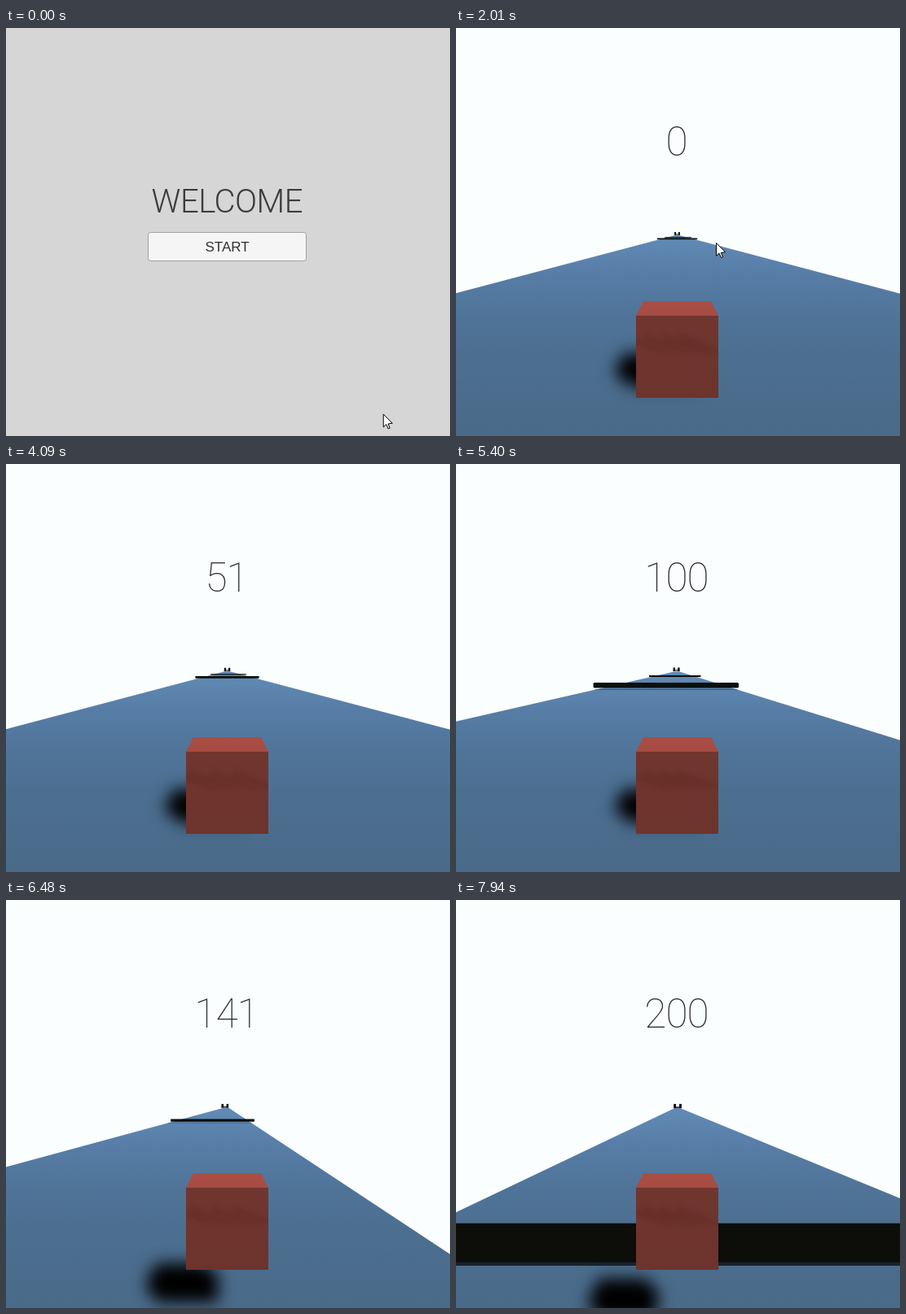
An HTML page with a canvas that plays this animation: 545x502 px, repeating every 8000 ms.

```html
<!DOCTYPE html>
<html lang="en">
<head>
<meta charset="utf-8">
<title>Cube runner</title>
<style>
  html, body { margin: 0; width: 100%; height: 100%; overflow: hidden; background: #d6d6d6; }
  canvas { display: block; }
</style>
</head>
<body>
<canvas id="stage" width="545" height="502"></canvas>
<script>
const ctx = document.getElementById('stage').getContext('2d');
const W = 545, H = 502, LOOP = 8000;

// Camera
const CX = 271.5, HORIZON = 254.5, FOCAL = 455;
const EYE = 1.98, BACK = 5;

// World
const HALF = 7.5, GATE = 662, END = 1500;
const BARS = [
  { z: 133.3, x: 0, top: 0.72, bottom: 0.22, color: '#0a100e' },
  { z: 202.4, x: 0.5, top: 0.68, bottom: 0.22, color: '#0d0d0a' }
];

// Keys: seconds followed by values
const CURSOR = [
  [0, 463, 475], [0.35, 372, 322], [0.54, 312, 233], [0.69, 299, 257],
  [0.77, 299, 257], [1, 533, 298], [1.24, 319, 264]
];
const SIDE = [[4.9, 0], [5.4, 1.15], [6.1, 2.85], [6.48, 3.13], [7.63, 0], [7.94, -0.56]];
const RUN = [[4.09, 51], [5.4, 100], [6.48, 141], [7.63, 188], [7.94, 200], [8, 202.3]];
const JUMPS = [[5.73, 4.9], [7.625, 5.77]];
const PRESS = 1.54, PLAY = 1.62, GO = 1.9, CURSOR_OFF = 2.25;

function track(keys, t) {
  if (t <= keys[0][0]) return keys[0].slice(1);
  for (let i = 1; i < keys.length; i++) {
    const a = keys[i - 1], b = keys[i];
    if (t <= b[0]) {
      const k = (t - a[0]) / (b[0] - a[0]);
      return a.slice(1).map((v, j) => v + (b[j + 1] - v) * k);
    }
  }
  return keys[keys.length - 1].slice(1);
}

// Speed builds up against drag, then stays nearly even
function distance(t) {
  if (t < GO) return 0;
  if (t >= RUN[0][0]) return track(RUN, t)[0];
  const s = t - GO, drag = 1.1;
  return 37.4 * (s - (1 - Math.exp(-drag * s)) / drag);
}

function lift(t) {
  let y = 0;
  for (const [start, speed] of JUMPS) {
    const s = t - start;
    if (s > 0) y = Math.max(y, speed * s - 4.9 * s * s);
  }
  return y;
}

function poly(points, fill) {
  ctx.beginPath();
  points.forEach(([x, y]) => ctx.lineTo(x, y));
  ctx.closePath();
  ctx.fillStyle = fill;
  ctx.fill();
}

function fade(y0, y1, ...colors) {
  const g = ctx.createLinearGradient(0, y0, 0, y1);
  colors.forEach((c, i) => g.addColorStop(i / (colors.length - 1), c));
  return g;
}

function text(str, x, y, font, color, spacing = 0) {
  ctx.font = font;
  ctx.letterSpacing = spacing + 'px';
  ctx.textAlign = 'center';
  ctx.fillStyle = color;
  ctx.fillText(str, x + spacing / 2, y);
}

function drawCursor(x, y) {
  ctx.save();
  ctx.translate(x + 0.5, y + 0.5);
  poly([[0, 0], [0, 16], [3.5, 12.6], [6, 18], [8, 17.2], [5.8, 12], [11, 11.2]], '#fff');
  ctx.strokeStyle = '#000';
  ctx.lineWidth = 1;
  ctx.stroke();
  ctx.restore();
}

function drawMenu(pressed) {
  ctx.fillStyle = '#d6d6d6';
  ctx.fillRect(0, 0, W, H);
  text('WELCOME', CX, 227.3, '300 40px Roboto, sans-serif', '#3c3c3c', -0.5);
  ctx.beginPath();
  ctx.roundRect(174.5, 251.5, 194, 35, 3);
  ctx.fillStyle = pressed ? '#c8c8c8' : '#f5f5f5';
  ctx.fill();
  ctx.strokeStyle = '#a0a0a0';
  ctx.lineWidth = 1;
  ctx.stroke();
  text('START', CX, 275.3, '17px "Liberation Sans", Arial, sans-serif', '#323232');
}

// Convex outline of a set of points
function hull(points) {
  const sorted = points.slice().sort((a, b) => a[0] - b[0] || a[1] - b[1]);
  const chain = list => {
    const out = [];
    for (const p of list) {
      while (out.length > 1) {
        const [a, b] = out.slice(-2);
        if ((b[0] - a[0]) * (p[1] - a[1]) - (b[1] - a[1]) * (p[0] - a[0]) > 0) break;
        out.pop();
      }
      out.push(p);
    }
    return out.slice(0, -1);
  };
  return chain(sorted).concat(chain(sorted.reverse()));
}

function drawGate(px, eye, dist) {
  const s = FOCAL / dist, x = CX - px * s;
  const yAt = h => HORIZON + (eye - h) * s;
  const post = 3 * s, top = yAt(7), base = yAt(1.6);
  ctx.fillStyle = '#0c0f10';
  ctx.fillRect(x - 5 * s, top, post, base - top);
  ctx.fillRect(x + 2 * s, top, post, base - top);
  ctx.fillRect(x - 5 * s, yAt(3.4), 10 * s, 1.4 * s);
}

function drawBar(bar, px, eye, z) {
  const d = bar.z - z + BACK;
  if (d < 1) return;
  const point = (x, h, depth) => [
    CX + (x - px) * FOCAL / depth, HORIZON + (eye - h) * FOCAL / depth
  ];
  const near = d + 0.35, far = d + 1.3;
  poly([point(-HALF, 0, near), point(HALF, 0, near), point(HALF, 0, far), point(-HALF, 0, far)], '#18222c');

  const [left, bottom] = point(bar.x - HALF, bar.bottom, d);
  const right = point(bar.x + HALF, 0, d)[0];
  const top = point(0, bar.top, d + 1)[1];
  const cut = Math.min(2, (bottom - top) / 6);
  poly([
    [left, top + cut], [left + cut, top], [right - cut, top], [right, top + cut],
    [right, bottom - cut], [right - cut, bottom], [left + cut, bottom], [left, bottom - cut]
  ], bar.color);
}

function drawShadow(eye, up) {
  const r = 0.44, points = [];
  for (const h of [up + 0.35, up + 1])
    for (const x of [-r, r])
      for (const z of [-r, r]) {
        const depth = BACK + z + 0.727 * h;
        points.push([CX + (x - 0.46 * h) * FOCAL / depth, HORIZON + eye * FOCAL / depth]);
      }
  ctx.save();
  ctx.filter = 'blur(9.5px)';
  poly(hull(points), '#000');
  ctx.restore();
}

function drawCube(z) {
  poly([[221, 354], [230, 336], [313, 336], [322, 354]], fade(336, 354, '#a94f45', '#a64b41'));
  ctx.fillStyle = fade(354, 455, '#713630', '#6f342e', '#6d332d');
  ctx.fillRect(221, 354, 101, 101);
  ctx.save();
  ctx.beginPath();
  ctx.rect(221, 354, 101, 101);
  ctx.clip();
  ctx.filter = 'blur(2px)';
  for (let i = 0; i < 4; i++) {
    const x = 206 + i * 23 + 3 * Math.sin(z * 0.7 + i), y = 375;
    poly([[x, y], [x + 62, y + 26], [x + 46, y + 25], [x, y + 10]], 'rgba(80, 32, 27, 0.2)');
  }
  ctx.restore();
}

function drawGame(t) {
  const z = distance(t), up = lift(t), eye = EYE + up, px = track(SIDE, t)[0];
  ctx.fillStyle = '#fbfeff';
  ctx.fillRect(0, 0, W, H);

  const edge = (x, depth) => [CX + (x - px) * FOCAL / depth, HORIZON + eye * FOCAL / depth];
  const far = END + BACK - z;
  poly([edge(-HALF, far), edge(HALF, far), edge(HALF, 0.5), edge(-HALF, 0.5)],
    fade(255, 502, '#618bb5', '#577da6', '#507499', '#4c6f91', '#4b6c8c', '#4a6a89'));

  drawGate(px, eye, GATE + BACK - z);
  for (const bar of BARS.slice().reverse()) drawBar(bar, px, eye, z);
  drawShadow(eye, up);
  drawCube(z);
  text(String(Math.round(z)), CX - 0.5, 157, '100 49.5px Roboto, sans-serif', '#2c2c2c', -1);
}

function render(now) {
  const t = (now % LOOP) / 1000;
  if (t < PLAY) drawMenu(t >= PRESS);
  else drawGame(t);
  if (t < CURSOR_OFF) drawCursor(...track(CURSOR, t));
}

const begin = performance.now();
function tick() {
  render(performance.now() - begin);
  requestAnimationFrame(tick);
}
tick();
</script>
</body>
</html>
```
